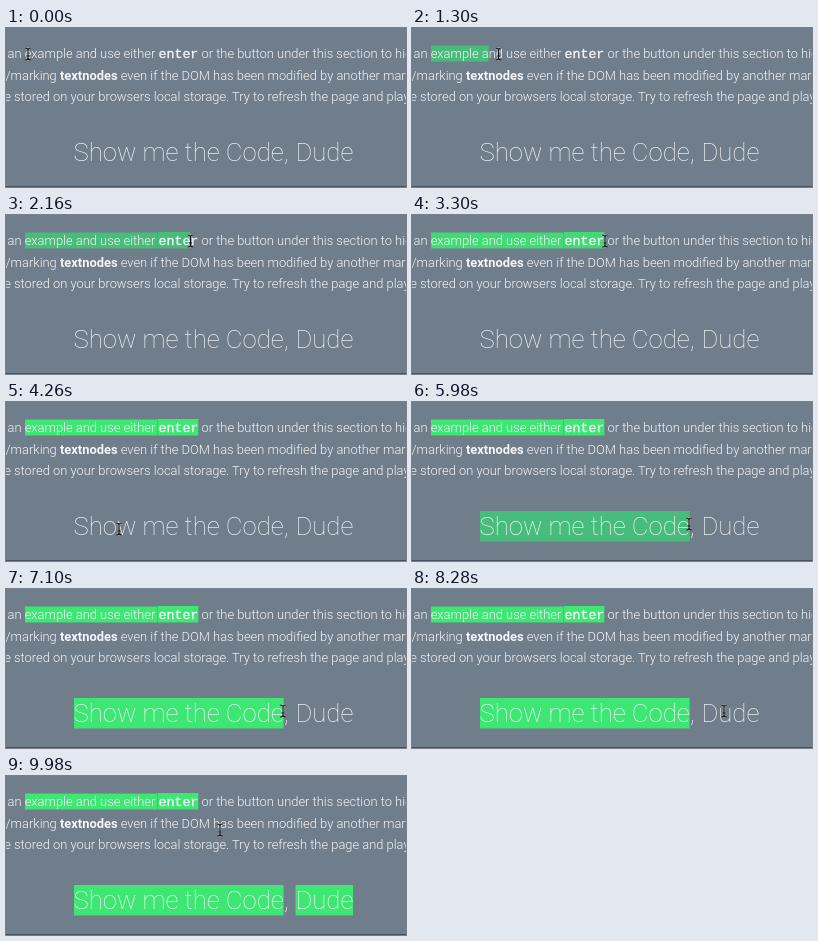
Animation, 400 px wide and 159 px high, one loop 10 s. Source, as an HTML page:

```html
<!DOCTYPE html>
<html lang="en">
<head>
<meta charset="utf-8">
<style>
  html, body { margin: 0; width: 100%; height: 100%; overflow: hidden; background: #707d8b; }
  svg { display: block; }
  text { fill: #f4f6f7; font: 300 12.9px Roboto, sans-serif; white-space: pre; }
  .bold { font-weight: 700; }
  .code { font: 400 13.3px "Courier New", "Liberation Mono", monospace; stroke: #f4f6f7; stroke-width: .35px; }
  #title { font-weight: 100; font-size: 25.7px; }
  #cursor path { fill: none; }
</style>
</head>
<body>
<svg width="400" height="159" viewBox="0 0 400 159">
  <rect y="158" width="400" height="1" fill="#46515d"/>
  <rect id="lineMark" x="19" y="17.5" height="16"/>
  <rect id="codeMark" x="152" y="17" height="16.5"/>
  <rect id="titleMark" x="68" y="109" height="30.5"/>
  <rect id="wordMark" x="289.5" y="109" height="30.5"/>

  <text id="line" x="1.5" y="30">an example and use either <tspan class="code">enter</tspan> or the button under this section to hide</text>
  <text x="-.5" y="51.5">/marking <tspan class="bold">textnodes</tspan> even if the DOM has been modified by another mark</text>
  <text x="-1.8" y="73">e stored on your browsers local storage. Try to refresh the page and play</text>
  <text id="title" y="133"><tspan x="67.5">Show me the Code,</tspan><tspan x="289.5">Dude</tspan></text>

  <g id="cursor">
    <path id="beam" d="M-3-6q3 0 3 2q0-2 3-2M0-4V4M-3 6q3 0 3-2q0 2 3 2M-1.5 2h3" stroke="#fff" stroke-opacity=".45" stroke-width="2.2"/>
    <path id="ink" stroke="#111" stroke-width="1.1"/>
  </g>
</svg>
<script>
const $ = id => document.getElementById(id);
$('ink').setAttribute('d', $('beam').getAttribute('d'));

const LAG = 45, FADE = 400;
const selected = [72, 188, 122], marked = [62, 230, 116];
const home = { x: 22, y: 26 };
const moves = [
  { start: 980, end: 2500, x: 193, y: 26 },   // drag over the line
  { start: 3900, end: 4260, x: 113, y: 127 },
  { start: 4300, end: 4900, x: 68, y: 125 },
  { start: 4920, end: 5980, x: 277, y: 122 }, // drag over the title
  { start: 7120, end: 7600, x: 312, y: 122 },
  { start: 9300, end: 9760, x: 214, y: 54 }
];
const clamp = v => Math.max(0, Math.min(1, v));
const mix = (a, b, k) => a + (b - a) * k;
const easeOut = u => 1 - (1 - u) ** 2;

function pointer(t) {
  return moves.reduce((p, m) => {
    const k = easeOut(clamp((t - m.start) / (m.end - m.start)));
    return { x: mix(p.x, m.x, k), y: mix(p.y, m.y, k) };
  }, home);
}

// Right edges of the letters from first to last
const edges = (text, first, last) => Array.from({ length: last - first + 1 },
  (_, i) => text.getEndPositionOfChar(first + i).x);
const lineEdges = edges($('line'), 2, 30);
const titleEdges = [68, ...edges($('title'), 0, 15)];

// A drag selects up to the letter edge nearest to the pointer.
function dragEnd(list, t, move) {
  if (t < move.start) return 0;
  const { x } = pointer(Math.min(t - LAG, move.end));
  return list.reduce((a, b) => Math.abs(b - x) < Math.abs(a - x) ? b : a);
}

function paint(id, t, markAt, right) {
  const rect = $(id), k = clamp((t - markAt) / FADE);
  const rgb = selected.map((c, i) => Math.round(mix(c, marked[i], k)));
  rect.setAttribute('width', Math.max(0, right - rect.x.baseVal.value));
  rect.setAttribute('fill', `rgb(${rgb})`);
}

function draw(t) {
  const lineEnd = dragEnd(lineEdges, t, moves[0]);
  paint('lineMark', t, 3020, Math.min(lineEnd, 151.6));
  paint('codeMark', t, 3020, lineEnd);
  paint('titleMark', t, 6680, dragEnd(titleEdges, t, moves[3]));
  paint('wordMark', t, 8800, t < 8440 ? 0 : 347);
  const { x, y } = pointer(t);
  $('cursor').setAttribute('transform', `translate(${x} ${y})`);
}

const start = performance.now();
function tick() {
  draw((performance.now() - start) % 10000);
  requestAnimationFrame(tick);
}
tick();
</script>
</body>
</html>
```
